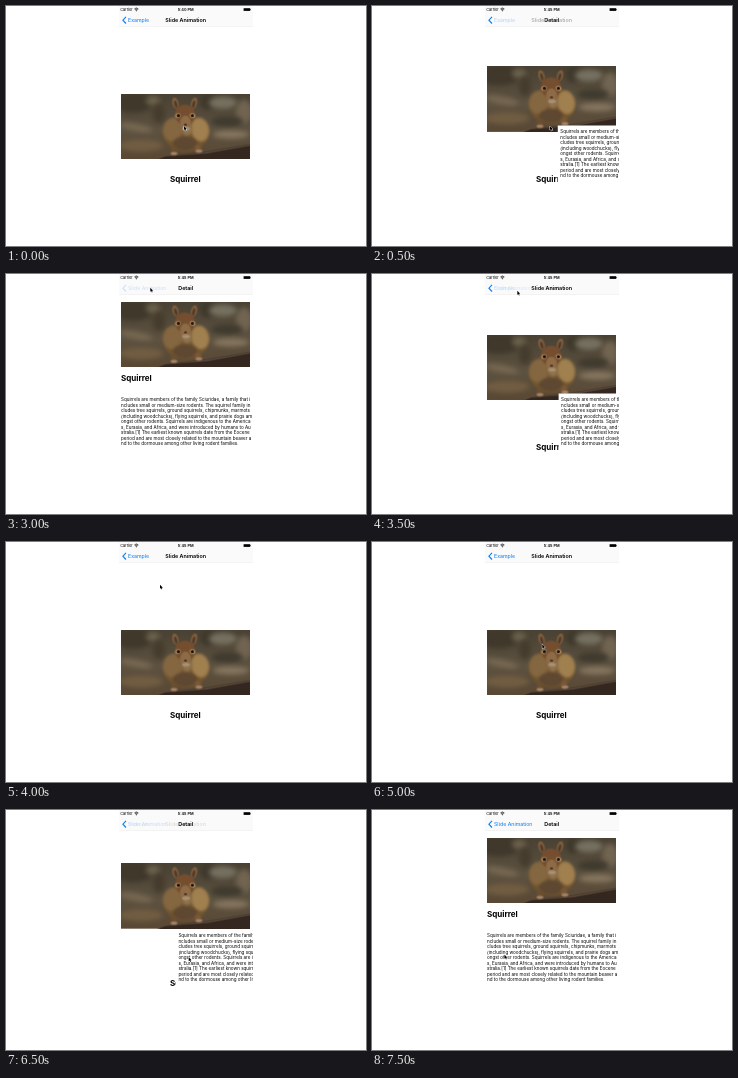
Animation, 360 px wide and 240 px high, one loop 8 s. Source, as an HTML page with a canvas:

```html
<!DOCTYPE html>
<html lang="en">
<head>
<meta charset="utf-8">
<title>Slide Animation</title>
<style>
html, body { margin: 0; width: 100%; height: 100%; overflow: hidden; background: #fff; }
canvas { display: block; width: 360px; height: 240px; }
</style>
</head>
<body>
<canvas id="stage"></canvas>
<script>
const W = 360, H = 240, LOOP = 8000, SLIDE = 480;
const LEFT = 113, RIGHT = 247, MID = 179.7;
const PIC = { x: 115, w: 129, h: 65.5, list: 87.7, detail: 27.5 };
const BLUE = '#0a7cf0';
const FONT = 'Inter, "Liberation Sans", sans-serif';
const BODY = [
  'Squirrels are members of the family Sciuridae, a family that i',
  'ncludes small or medium-size rodents. The squirrel family in',
  'cludes tree squirrels, ground squirrels, chipmunks, marmots',
  '(including woodchucks), flying squirrels, and prairie dogs am',
  'ongst other rodents. Squirrels are indigenous to the America',
  's, Eurasia, and Africa, and were introduced by humans to Au',
  'stralia.[1] The earliest known squirrels date from the Eocene',
  'period and are most closely related to the mountain beaver a',
  'nd to the dormouse among other living rodent families.'
];
// time, x, y of the pointer tip
const POINTER = [
  [0, 178, 120], [1250, 178, 120], [2450, 146, 22], [2800, 144.3, 13.7],
  [3400, 144.3, 13.7], [3900, 154, 42.7], [4400, 154, 42.7],
  [5500, 182.7, 147.2], [6800, 182.7, 147.2], [7400, 132.4, 144.7], [8000, 132.4, 144.7]
];
const PUSHES = [276, 6238], POP = 3244, PRESS = 2800;

const canvas = document.getElementById('stage');
const ctx = canvas.getContext('2d');
const dpr = window.devicePixelRatio || 1;
canvas.width = W * dpr;
canvas.height = H * dpr;

const clamp = v => Math.min(1, Math.max(0, v));
const smooth = v => { v = clamp(v); return v * v * (3 - 2 * v); };
const mix = (a, b, k) => a + (b - a) * k;

function oval(c, x, y, rx, ry, color, turn = 0) {
  c.fillStyle = color;
  c.beginPath();
  c.ellipse(x, y, rx, ry, turn, 0, Math.PI * 2);
  c.fill();
}

function poly(c, pts, color) {
  c.fillStyle = color;
  c.beginPath();
  pts.forEach(([x, y]) => c.lineTo(x, y));
  c.closePath();
  c.fill();
}

function makePhoto() {
  const s = 3, pic = document.createElement('canvas');
  pic.width = PIC.w * s;
  pic.height = Math.round(PIC.h * s);
  const c = pic.getContext('2d');
  c.scale(s, s);
  const ground = c.createLinearGradient(0, 0, 0, PIC.h);
  ground.addColorStop(0, '#494133');
  ground.addColorStop(0.55, '#5d5241');
  ground.addColorStop(1, '#594834');
  c.fillStyle = ground;
  c.fillRect(0, 0, PIC.w, PIC.h);

  c.filter = 'blur(8px)';
  oval(c, 12, 9, 20, 10, '#40382b');
  oval(c, 32, 7, 7, 5, '#6b614d');
  oval(c, 15, 34, 17, 4, '#766750', 0.2);
  oval(c, 20, 52, 22, 6, '#715d42');
  oval(c, 38, 20, 6, 10, '#453c2d');
  oval(c, 86, 8, 7, 8, '#3f392c');
  oval(c, 102, 9, 14, 6, '#757060');
  oval(c, 123, 18, 8, 12, '#716451');
  oval(c, 106, 28, 16, 5, '#3f3a2e');
  oval(c, 110, 41, 18, 4, '#86765f');

  c.filter = 'blur(1.5px)';
  poly(c, [[34, 67], [44, 63], [86, 58], [130, 50.5], [130, 67]], '#33271f');
  poly(c, [[44, 63], [86, 58], [130, 50.5], [130, 52], [86, 60]], '#57473a');

  c.filter = 'blur(4px)';
  oval(c, 65, 40, 22, 18, '#72552f');
  oval(c, 52, 36, 10, 12, '#846740', 0.2);
  oval(c, 79, 36, 9, 12, '#a1804f', -0.2);
  oval(c, 64, 50, 12, 7, '#5e4832');
  oval(c, 66, 36, 5, 6, '#8f7451');
  oval(c, 53, 57, 3, 4, '#6d4f30');
  oval(c, 77, 55, 3, 4, '#7d5a36');
  c.filter = 'blur(2px)';
  oval(c, 53, 60, 3.5, 1.6, '#a5846a');
  oval(c, 78, 57.5, 3.5, 1.6, '#a5846a');
  oval(c, 54.5, 9.5, 3, 5.8, '#86613f', -0.25);
  oval(c, 73, 9.5, 3, 5.8, '#86613f', 0.25);
  oval(c, 54.8, 10.5, 1.4, 4, '#4b3828', -0.25);
  oval(c, 72.7, 10.5, 1.4, 4, '#4b3828', 0.25);
  oval(c, 64, 21, 10, 10, '#754e2f');
  oval(c, 64.5, 29, 5.5, 7, '#8d6b47');
  oval(c, 65, 35, 4, 2, '#aa9070');
  oval(c, 56.8, 22, 2.8, 2.3, '#aa875d', -0.3);
  oval(c, 71.6, 22, 2.8, 2.3, '#b7966b', 0.3);
  c.filter = 'blur(1px)';
  oval(c, 57.4, 22, 1.6, 1.5, '#19130f');
  oval(c, 71.4, 22, 1.6, 1.5, '#19130f');
  oval(c, 64.5, 31, 1.5, 1.1, '#4d3325');
  return pic;
}
const photo = makePhoto();

function text(str, x, y, size, weight, color = '#000', align = 'left', alpha = 1) {
  if (alpha <= 0) return;
  ctx.globalAlpha = alpha;
  ctx.font = `${weight} ${size}px ${FONT}`;
  ctx.textAlign = align;
  ctx.fillStyle = color;
  ctx.fillText(str, x, y);
  ctx.globalAlpha = 1;
}

function statusBar(t) {
  text('Carrier', 114.2, 5.3, 3.85, 400);
  ctx.strokeStyle = '#000';
  ctx.lineWidth = 0.6;
  for (const r of [1.1, 2, 2.9]) {
    ctx.beginPath();
    ctx.arc(130.4, 5, r, -Math.PI * 0.75, -Math.PI * 0.25);
    ctx.stroke();
  }
  oval(ctx, 130.4, 4.8, 0.5, 0.5, '#000');
  text(t < 250 ? '5:40 PM' : '5:45 PM', MID, 5.3, 3.95, 600, '#000', 'center');
  ctx.fillStyle = '#000';
  ctx.fillRect(237.6, 2.2, 6.6, 2.7);
  ctx.fillRect(244.4, 3, 0.5, 1.1);
}

function navBar(t, p, popping) {
  ctx.fillStyle = '#fafafa';
  ctx.fillRect(LEFT, 0, RIGHT - LEFT, 20.5);
  ctx.fillStyle = '#e8e8e8';
  ctx.fillRect(LEFT, 20.5, RIGHT - LEFT, 0.5);
  statusBar(t);

  const q = popping ? 1 - p : p;
  const out = clamp(1 - 1.55 * q), title = clamp(2 * q), label = clamp((q - 0.45) / 0.55);
  const [listTitle, detailTitle] = popping ? [title, out] : [out, title];
  const [listBack, detailBack] = popping ? [label, out] : [out, label];
  const press = t >= PRESS && t < POP ? 0.2 : 1;

  ctx.globalAlpha = press;
  ctx.strokeStyle = BLUE;
  ctx.lineWidth = 1.1;
  ctx.beginPath();
  ctx.moveTo(120, 10.9);
  ctx.lineTo(116.9, 14.2);
  ctx.lineTo(120, 17.5);
  ctx.stroke();
  ctx.globalAlpha = 1;

  text('Example', 122, 16.2, 5.25, 400, BLUE, 'left', listBack);
  text('Slide Animation', 122, 16.2, 5.25, 400, BLUE, 'left', detailBack * press);
  text('Slide Animation', MID, 16.2, 5.4, 600, '#000', 'center', listTitle);
  text('Detail', MID, 16.2, 5.4, 600, '#000', 'center', detailTitle);
}

function page(p) {
  ctx.drawImage(photo, PIC.x, mix(PIC.list, PIC.detail, p), PIC.w, PIC.h);
  const k = smooth((p - 0.6) / 0.4);
  text('Squirrel', mix(164, 115, k), mix(176.2, 107.2, k), 8, 700);
  if (p <= 0) return;
  const x = mix(RIGHT + 2, 115, p);
  ctx.fillStyle = '#fff';
  ctx.fillRect(x - 2.5, 119.5, RIGHT - x + 2.5, 66);
  BODY.forEach((line, i) => text(line, x, 127.4 + i * 5.45, 4.55, 400));
}

function pointer(t) {
  const i = POINTER.findIndex(k => k[0] > t);
  const [t0, x0, y0] = POINTER[i - 1], [t1, x1, y1] = POINTER[i];
  const k = smooth((t - t0) / (t1 - t0));
  ctx.save();
  ctx.translate(mix(x0, x1, k), mix(y0, y1, k));
  ctx.scale(0.85, 0.85);
  ctx.beginPath();
  [[0, 0], [0, 4.9], [1.1, 3.9], [1.9, 5.6], [2.7, 5.2], [1.9, 3.6], [3.4, 3.5]]
    .forEach(([x, y]) => ctx.lineTo(x, y));
  ctx.closePath();
  ctx.lineWidth = 0.9;
  ctx.strokeStyle = '#fff';
  ctx.stroke();
  ctx.fillStyle = '#000';
  ctx.fill();
  ctx.restore();
}

function progress(t) {
  if (t >= PUSHES[1]) return smooth((t - PUSHES[1]) / SLIDE);
  if (t >= POP) return 1 - smooth((t - POP) / SLIDE);
  return smooth((t - PUSHES[0]) / SLIDE);
}

function draw(t) {
  ctx.setTransform(dpr, 0, 0, dpr, 0, 0);
  ctx.fillStyle = '#fff';
  ctx.fillRect(0, 0, W, H);
  ctx.save();
  ctx.beginPath();
  ctx.rect(LEFT, 0, RIGHT - LEFT, H);
  ctx.clip();
  const p = progress(t);
  page(p);
  navBar(t, p, t >= POP && t < PUSHES[1]);
  pointer(t);
  ctx.restore();
}

const start = performance.now();
function tick() {
  draw((performance.now() - start) % LOOP);
  requestAnimationFrame(tick);
}
tick();
</script>
</body>
</html>
```
